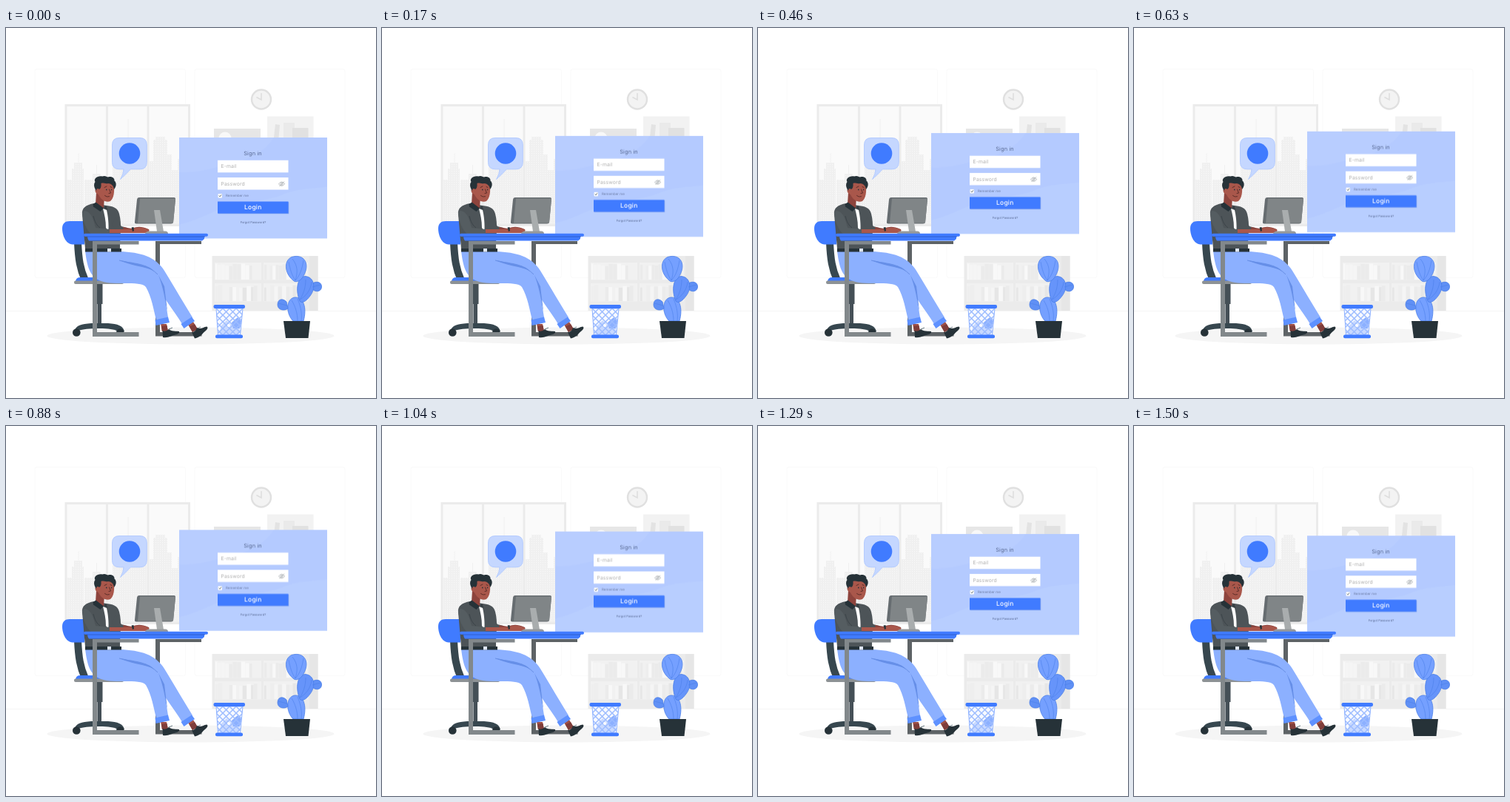
An HTML page for the animation above (1540 ms loop, 500 by 500 pixels).

```html
<!DOCTYPE html>
<html lang="en">
<head>
<meta charset="utf-8">
<title>Sign in</title>
<style>
  html, body { margin: 0; width: 100%; height: 100%; overflow: hidden; background: #fff; }
  svg { display: block; width: 100vw; height: 100vh; }
  text { font-family: Inter, "Open Sans", sans-serif; text-rendering: geometricPrecision; }
  #panel { animation: float 1540ms linear infinite; }
  @keyframes float {
    0%, 100% { transform: translateY(-.3px); }
    47.27% { transform: translateY(-10px); }
    95.97% { transform: translateY(0); }
  }
</style>
</head>
<body>
<svg viewBox="0 0 500 500">
  <defs>
    <pattern id="lights" width="3" height="3" patternUnits="userSpaceOnUse">
      <rect width="3" height="3" fill="#f0f0f0"/>
      <rect x="1" y="1" width="1" height="1.3" fill="#f8f8f8"/>
    </pattern>
    <pattern id="mesh" width="9" height="9" x="284" y="379" patternUnits="userSpaceOnUse">
      <path d="M-1-1 10 10M-1 10 10-1" stroke="#9dbcff" stroke-width="1.5"/>
    </pattern>
    <clipPath id="card"><rect x="234" y="148.2" width="200" height="136.5"/></clipPath>
  </defs>

  <!-- Room -->
  <g fill="none" stroke="#fafafa">
    <rect x="39" y="55.5" width="203.500" height="282" rx="3"/>
    <rect x="255" y="55.5" width="203" height="282" rx="3"/>
    <path d="M0 382.500H500" stroke="#f4f4f4"/>
  </g>
  <ellipse cx="249.500" cy="416" rx="194" ry="11.500" fill="#f5f5f5"/>

  <!-- Window -->
  <rect x="81" y="104.500" width="166.500" height="162" fill="#fafafa"/>
  <g id="city" fill="url(#lights)"></g>
  <g fill="none" stroke="#ebebeb" stroke-width="3">
    <rect x="81" y="104.500" width="166.500" height="162"/>
    <path d="M136.500 104V266M192 104V266"/>
  </g>

  <!-- Clock, pictures -->
  <circle cx="345" cy="96.500" r="13" fill="#f3f3f3" stroke="#e0e0e0" stroke-width="2.400"/>
  <path d="M345 88V97L338.500 93.500" fill="none" stroke="#dedede" stroke-width="1.600"/>
  <path d="M281 136H344V175H281Z" fill="#e6e6e6"/>
  <circle cx="296" cy="149" r="8.500" fill="#f8f8f8"/>
  <path d="M353 119.500H415.500V175H353Z" fill="#f2f2f2"/>
  <path d="M364 130 370 131 367 165H360Z" fill="#e3e3e3"/>
  <path d="M375 128H390V165H375Z" fill="#eaeaea"/>
  <path d="M387 135H408.500V165H387Z" fill="#e1e1e1"/>

  <!-- Bookcase -->
  <path d="M278.500 308H421.500V382H278.500Z" fill="#ebebeb"/>
  <path d="M410 308H421.500V382H410Z" fill="#e6e6e6"/>
  <path d="M282 317H345V340.500H282ZM348 317H408V340.500H348ZM282 345H345V369.500H282ZM348 345H408V369.500H348Z" fill="#f1f1f1"/>
  <g id="books"></g>

  <!-- Login panel -->
  <g id="panel">
    <g clip-path="url(#card)">
      <path d="M234 148H434V285H234Z" fill="#b4caff"/>
      <path d="M234 148H362C352 166 326 180 300 185C275 190 259 197 234 195Z" fill="#b8cdff"/>
      <path d="M434 215C408 218 396 217 375 225C352 235 330 233 304 240C278 248 260 260 234 266V285H434Z" fill="#b8ceff"/>
    </g>
    <text x="333.500" y="172.200" font-size="7.400" letter-spacing=".15" text-anchor="middle" fill="#5a6b94">Sign in</text>
    <path d="M286 179H381.500V195.500H286ZM286 202.200H381.500V218.800H286Z" fill="#fff"/>
    <g font-size="6.800" letter-spacing=".1" fill="#b0b0b0">
      <text x="290.500" y="189.600">E-mail</text>
      <text x="290.500" y="213">Password</text>
    </g>
    <g fill="none" stroke="#9a9fa4" stroke-width=".7">
      <path d="M368.500 211Q372.500 205.700 376.700 211Q372.500 216.200 368.500 211ZM369.500 214.200 376 207.700"/>
      <circle cx="372.600" cy="211" r="1.500"/>
    </g>
    <rect x="286.500" y="224.200" width="5.500" height="5.500" rx="1" fill="#fff"/>
    <path d="M287.800 226.900 289 228.200 291 225.600" fill="none" stroke="#37474f" stroke-width=".8"/>
    <text x="297" y="228.600" font-size="4.500" fill="#6a7aa2">Remember me</text>
    <path d="M286.700 235.500H382.300V251.600H286.700Z" fill="#85a6ef"/>
    <path d="M286 234.700H381.500V250.700H286Z" fill="#407bff"/>
    <text x="333.800" y="245.300" font-size="8.500" letter-spacing=".2" font-weight="500" text-anchor="middle" fill="#fff">Login</text>
    <text x="334" y="263.900" font-size="4.100" text-anchor="middle" fill="#5a6b94">Forgot Password?</text>
  </g>

  <!-- Speech bubble -->
  <path d="M153 148.500H181Q190.300 148.500 190.300 158V181.500Q190.300 190.800 181 190.800H168.500Q161 199 154.500 204.500Q158.500 198 159 190.800H153Q143.500 190.800 143.500 181.500V158Q143.500 148.500 153 148.500Z" fill="#c5d7ff" stroke="#aac5ff" stroke-width=".8"/>
  <circle cx="167" cy="169.500" r="14.300" fill="#407bff"/>

  <!-- Chair -->
  <path d="M97 290C98 312 100 326 107 341" fill="none" stroke="#37474f" stroke-width="10"/>
  <path d="M86 261H106V292.500H90C80 292 76 279 76 271C76 264 80 261 86 261Z" fill="#407bff"/>
  <path d="M94 342Q95 337 100 337H158V342Z" fill="#407bff"/>
  <rect x="92" y="341.500" width="67" height="4.500" rx="2" fill="#8d9295"/>
  <path d="M122 346H130.500V373H129V401H123.500V373H122Z" fill="#455057"/>
  <path d="M93 409C94 402 102 400 115 399H138C151 400 158 402 160 410H151C147 407 138 406 126 406C112 406 104 407 98 409Z" fill="#37474f"/>
  <circle cx="95.300" cy="411.500" r="5.300" fill="#263238"/>
  <path d="M149 411.500A5.300 5.300 0 0 1 159.600 411.500Z" fill="#263238"/>

  <!-- Right desk leg -->
  <path d="M202 288H264V292H208V411H264.500V416.500H202Z" fill="#5e6366"/>

  <!-- Legs -->
  <path d="M209 400H217L219 410H211ZM246 401 253 397 259 407 252 411Z" fill="#9f5046"/>
  <path d="M210 403 217.500 402 219 410H211ZM248 403.500 255 400 259 407 252 411Z" fill="#7f3e3b"/>
  <path d="M211.500 409Q216 411 220 407C225 411 229 409 234 410Q235 413 229 414.500C223 416 220 419 212 418Z" fill="#263238"/>
  <path d="M251 411Q256 411 258 405C264 408 266 404 271.500 403.500Q274 405 270 409C265 413 263 418 255 419.500Z" fill="#263238"/>
  <path d="M220 407 225 405M259 406 263 404" stroke="#455a64" stroke-width=".8"/>
  <path d="M130 302H154C182 303 202 309 214 328C228 351 241 373 252 391L238 400C227 382 213 366 204 346L140 335Z" fill="#8cb0ff"/>
  <path d="M206 334 214 349 218 382C213 365 209 350 206 334Z" fill="#668fe8"/>
  <path d="M107 301H150L154 315C176 319 196 322 205 332C212 347 216 371 219 391L203 395C199 379 197 364 189 350C185 345 174 345 160 345C146 345 134 345 126 341C112 335 109 318 107 301Z" fill="#8cb0ff"/>
  <path d="M153 314C174 319 194 321 205 333" fill="none" stroke="#658ce0" stroke-width=".9"/>
  <path d="M153 314C172 317 191 319 200 328C186 322 168 321 153 314Z" fill="#668fe8"/>
  <path d="M201.500 394.500 219 390.500 221 398 202.500 402ZM236.500 400 251 390.500 255 396 240.500 406Z" fill="#5e91ff"/>

  <!-- Torso -->
  <path d="M119 237C108 239 102 243 103 252L107 298H154C154 280 157 266 153 251C151 243 145 241 136 240Z" fill="#4d5458"/>
  <path d="M131 244 136 246C138 254 139 265 138.500 275L135 270C135 260 133 252 131 244Z" fill="#fff"/>
  <path d="M107 298H156V302.500H107Z" fill="#263238"/>
  <path d="M137 298h5v4.500h-5z" fill="#dfe7f5"/>
  <path d="M122 222 133 229 132 243C127 244 123 242 121 238Z" fill="#8d443d"/>
  <path d="M117.500 238 121.500 235.500 132 243.500 127.500 248 118 241.500Z" fill="#263238"/>
  <path d="M132.500 243 135 240 137.500 246Z" fill="#343c41"/>

  <!-- Head -->
  <path d="M124 209C130 204 142 206 145.500 212C147 220 146 230 141 234C135 237 127 231 125 225C120 224 119 217 123 216Z" fill="#a9574b"/>
  <path d="M122 220C119 216 118 211 120.500 208C118 204 123 199.500 130 200.500C134 199 136 201 138 201.500C143 200 147 203 146.500 206.500C150 209 149 215 146 218C145.500 213 142 210 138 210C134 211 131 208.500 128.500 210C129 214 128 217 126 218C124 216 122 217 122 220Z" fill="#263238"/>
  <g fill="none" stroke="#4a2420" stroke-width=".8" stroke-linecap="round">
    <path d="M133 215.500 136 214M141 214.500 143 215.500M139.500 218 141.500 223 139 223.500M133.500 226.500Q136 229 139.500 227.800"/>
  </g>
  <path d="M135 218.500h1.500M142 218.500h1.200" stroke="#263238" stroke-width="1.700"/>

  <!-- Arms and monitor -->
  <path d="M148 256 156 268 164 270 162 276 150 275 143 265Z" fill="#4d5458"/>
  <path d="M158 269 170 271C178 268 183 268 193 272Q195 275 190 276L160 277Z" fill="#8d443d"/>
  <path d="M138 272 169 272C178 269 187 269 193 273Q194 277 187 277H138Z" fill="#a9574b"/>
  <path d="M169.500 269.500 172.500 269 173 274 171 275Z" fill="#263238"/>
  <path d="M106 247C115 248 118 258 121 270L140 272V279H116C108 273 104 261 103 249Z" fill="#555d61"/>
  <path d="M118 254C120 262 122 266 127 270" fill="none" stroke="#394247" stroke-width=".9"/>
  <path d="M180 229H227Q229.500 229 229 232L226 262Q225.600 264.500 223 264.500H176Q173.700 264.500 174 262L177 232Q177.400 229 180 229Z" fill="#666c70"/>
  <path d="M181 230.500H229L226 263.500H178Z" fill="#808587"/>
  <path d="M200 246H208L213 275H204Z" fill="#a9adae"/>
  <path d="M188 278Q189 274.500 194 274.500H215Q219 274.500 219 278Z" fill="#96999b"/>

  <!-- Desk -->
  <path d="M117 288H179.500V292.500H123V411H179.500V417H117Z" fill="#82888b"/>
  <path d="M110 281H268V285L265 287.500H112Q110 285 110 281Z" fill="#407bff"/>
  <rect x="105" y="277.800" width="168" height="4" rx="2" fill="#407bff"/>
  <path d="M109 282H269" stroke="#2e5dc7" stroke-width=".9"/>

  <!-- Bin -->
  <path d="M284 379H320L316.500 415H286.500Z" fill="#f8faff"/>
  <path d="M291 402 298 395 304 401 310 393 317 397 315 414H288Z" fill="#c8d9ff"/>
  <path d="M305 398 313 391 318 396 316 406 307 406Z" fill="#8cb0ff"/>
  <path d="M284 379H320L316.500 415H286.500Z" fill="url(#mesh)" stroke="#8cb0ff"/>
  <circle cx="301" cy="402" r="2" fill="#fff"/>
  <rect x="280.500" y="374" width="42.500" height="5" rx="2" fill="#407bff"/>
  <rect x="283" y="414.500" width="37" height="4.700" rx="2" fill="#407bff"/>

  <!-- Cactus -->
  <g fill="#75a0ff" stroke="#4a7ee8" stroke-width=".8">
    <path d="M388 396C378 386 378 366 390 364C402 363 407 378 402 396Z"/>
    <path d="M381 379C376 383 367 381 367 374C367 367 373 364 379 370Z" fill="#6090f5"/>
    <path d="M413 346C417 342 426 342 426.500 349C427 356 419 358 414 353Z" fill="#6090f5"/>
    <path d="M397 369C391 355 393 337 404 335.500C417 336 419 352 411 362C406 369 400 373 397 369Z" fill="#6694fa"/>
    <path d="M390 342.500C377 334 374 315 386 309.500C400 305 409 315 405 328C402 338 396 344 390 342.500Z"/>
    <path d="M387 312C395 322 394 331 391 341M382 316C384 326 386 334 391 341M402 314C400 326 397 335 391 341M405 340C405 350 402 360 397 367M413 343C412 354 405 363 397 367M386 368C391 376 394 386 394 396M394 366C399 378 400 387 399 396M368 372 380 375M414 350 425 347" fill="none" opacity=".7"/>
  </g>
  <path d="M375 396H411L408.500 419H378Z" fill="#263238"/>
</svg>
<script>
  const NS = "http://www.w3.org/2000/svg";
  const rect = (parent, x, y, width, height, fill) => {
    const el = document.createElementNS(NS, "rect");
    const attrs = { x, y, width, height, ...(fill && { fill }) };
    for (const key in attrs) el.setAttribute(key, attrs[key]);
    parent.append(el);
  };

  let seed = 7;
  const rand = () => (seed = (seed * 16807) % 2147483647) / 2147483647;

  // Skyline: left, top, width
  const city = document.getElementById("city");
  [[83, 205, 7], [89, 190, 16], [92, 182, 11], [97.500, 169, 1], [106, 205, 12],
   [117, 197, 11], [122, 185, 1], [128, 214, 8], [138, 204, 7], [144, 188, 14],
   [157, 150, 16], [164.500, 123, 1], [172, 188, 18], [194, 180, 7], [199, 151, 19],
   [202, 147, 13], [217, 171, 7], [223, 192, 10], [232, 177, 14]]
    .forEach(([x, y, w]) => rect(city, x, y, w, 265 - y));

  // Books stand on four shelves
  const books = document.getElementById("books");
  const tones = ["#e6e6e6", "#f8f8f8", "#ebebeb", "#f5f5f5", "#eeeeee"];
  for (const [left, right, floor] of [[283, 344, 340], [349, 407, 340], [283, 344, 369], [349, 407, 369]]) {
    for (let x = left; x < right - 6;) {
      const w = 2.5 + rand() * 3, h = 18 + rand() * 4;
      if (rand() > .12) rect(books, x, floor - h, w, h, tones[Math.floor(rand() * 5)]);
      x += w + .4;
    }
  }
</script>
</body>
</html>
```
